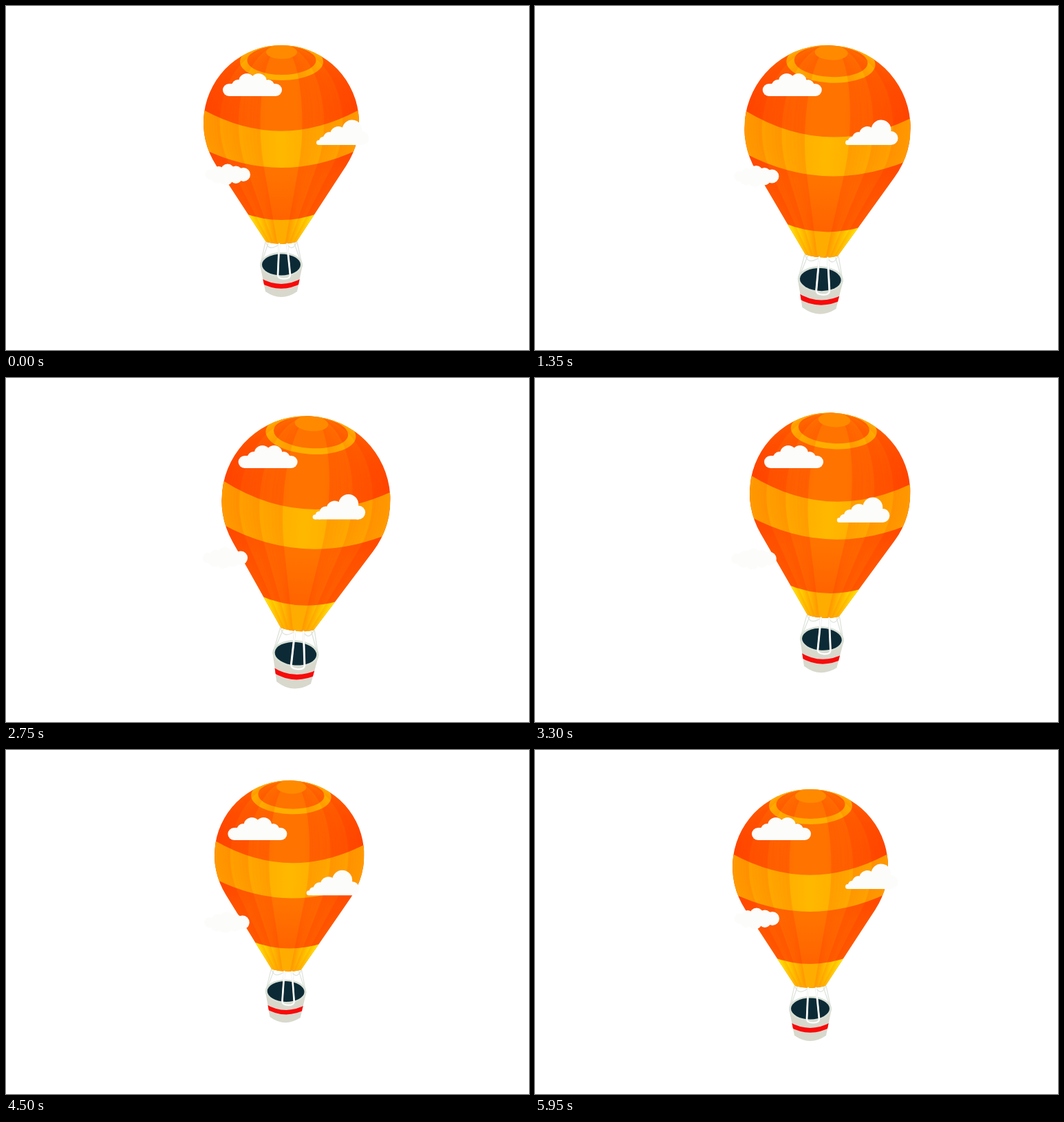
These frames come from a looping animation (760x500 px, 6 s). An HTML page:

```html
<!DOCTYPE html>
<html lang="en">
<head>
<meta charset="utf-8">
<title>Balloon</title>
<style>
  html, body { margin: 0; width: 100%; height: 100%; overflow: hidden; background: #fff; }
  svg { display: block; width: 760px; height: 500px; }
  .cloud { fill: #fcfcfa; }
  .rope { fill: none; stroke-linecap: round; stroke-linejoin: round; }
</style>
</head>
<body>
<svg viewBox="0 0 760 500">
  <defs>
    <linearGradient id="red" gradientUnits="userSpaceOnUse" x1="287" x2="400" spreadMethod="reflect">
      <stop offset="0" stop-color="#ff4300"/>
      <stop offset=".4" stop-color="#ff5c00"/>
      <stop offset=".8" stop-color="#ff7300"/>
    </linearGradient>
    <linearGradient id="yellow" gradientUnits="userSpaceOnUse" x1="287" x2="400" spreadMethod="reflect">
      <stop offset="0" stop-color="#ff9c00"/>
      <stop offset="1" stop-color="#ffb800"/>
    </linearGradient>
    <linearGradient id="skirt" gradientUnits="userSpaceOnUse" x1="351" x2="400" spreadMethod="reflect">
      <stop offset="0" stop-color="#ffee00"/>
      <stop offset=".8" stop-color="#ffac00"/>
    </linearGradient>
    <linearGradient id="shade" x2="0" y2="1">
      <stop offset="0" stop-color="#ff3000" stop-opacity="0"/>
      <stop offset="1" stop-color="#ff3000" stop-opacity=".25"/>
    </linearGradient>
    <path id="bandShape" d="M287 151Q400 212.500 513 151V208Q400 262 287 208Z"/>
    <path id="skirtShape" d="M345 301Q400 321 455 301V350H345Z"/>
    <path id="ringShape" fill-rule="evenodd" clip-rule="evenodd"
      d="M340 81a60.500 27 0 0 1 121 0a60.500 27 0 0 1 -121 0ZM350.500 79a50 21 0 0 1 100 0a50 21 0 0 1 -100 0Z"/>
    <clipPath id="trim">
      <use href="#bandShape"/><use href="#skirtShape"/><use href="#ringShape"/>
    </clipPath>
    <clipPath id="hull"><path id="hullPath"/></clipPath>
    <path id="tubShape" d="M369 376L377 415Q400 431 423 415L431 376Z"/>
    <clipPath id="tub"><use href="#tubShape"/></clipPath>
    <path id="loop" d="M397 346L395 391Q395 396.500 404 396.500Q413 396.500 413 391L408.500 346"/>
    <g id="panels" fill="#ff3000" fill-rule="evenodd"></g>
  </defs>

  <g id="balloon">
    <g clip-path="url(#hull)">
      <rect x="280" y="50" width="240" height="300" fill="url(#red)"/>
      <rect x="280" y="245" width="240" height="68" fill="url(#shade)"/>
      <use href="#panels"/>
      <use href="#bandShape" fill="url(#yellow)"/>
      <use href="#skirtShape" fill="url(#skirt)"/>
      <use href="#ringShape" fill="#ffae00"/>
      <g clip-path="url(#trim)"><use href="#panels" opacity=".6"/></g>
      <ellipse cx="400.5" cy="67" rx="22.5" ry="10" fill="#ff8a00"/>
    </g>

    <g class="rope" stroke="#dfe4dc" stroke-width="1.3">
      <path d="M377 343L370 375M381 345L373 368M423 343L430 375M419 345L427 368"/>
      <path d="M378 344Q382 357 396 347M409 347Q416 357 422 344"/>
    </g>

    <use href="#tubShape" fill="#d8d8cd"/>
    <path clip-path="url(#tub)" fill="#f80a0a" d="M368 394.500Q400 413.500 432 394.500V401.500Q400 420 368 401.500Z"/>
    <ellipse cx="400" cy="376" rx="31" ry="18" fill="#d9e0d5"/>
    <ellipse cx="400" cy="376" rx="28" ry="15.500" fill="#0c2a36"/>
    <use href="#loop" class="rope" stroke="#dfe4dc" stroke-width="2.800"/>
    <use href="#loop" class="rope" stroke="#fff" stroke-width="2"/>
  </g>

  <g id="cloudA" class="cloud">
    <rect x="315" y="113" width="86" height="18" rx="9"/>
    <circle cx="337" cy="116" r="9"/>
    <circle cx="350" cy="110" r="12"/>
    <circle cx="367" cy="110" r="12"/>
    <circle cx="381" cy="116" r="9"/>
  </g>

  <g id="cloudB" class="cloud">
    <path d="M454.500 202L470 188L502 180L518 202Z"/>
    <circle cx="454.500" cy="198.500" r="3.500"/>
    <circle cx="461" cy="196" r="6"/>
    <circle cx="470" cy="192" r="9"/>
    <circle cx="483" cy="187" r="12"/>
    <circle cx="503" cy="180" r="14.500"/>
    <circle cx="517.500" cy="192" r="10"/>
  </g>

  <g id="cloudC" class="cloud">
    <circle cx="297" cy="245" r="7.500"/>
    <circle cx="309" cy="242" r="9"/>
    <circle cx="322" cy="239.500" r="10"/>
    <circle cx="334" cy="242" r="9.500"/>
    <circle cx="345" cy="245" r="10"/>
    <circle cx="307" cy="249" r="9"/>
    <circle cx="320" cy="251" r="9.500"/>
    <circle cx="334" cy="249" r="9"/>
  </g>
</svg>

<script>
const LOOP = 6000, STEP = 50;
const HIGH = 2250, LOW = 4350; // times of the largest and the smallest pose
const $ = id => document.getElementById(id);

// Envelope outline, squeezed sideways by k
function outline(k) {
  const x = d => (400 + d * k).toFixed(2);
  return `M${x(94.3)} 232.2A${113 * k} 113 0 1 0 ${x(-94.3)} 232.2` +
    `L${x(-22)} 343Q400 349 ${x(22)} 343Z`;
}

// Each panel is darkest along its inner seam and fades outward
function panelShading() {
  const seams = [.27, .55, .79, 1], slices = 6;
  let rings = '';
  for (let i = 0; i < 3; i++) {
    const width = (seams[i + 1] - seams[i]) / slices;
    for (let j = 0; j < slices; j++) {
      const k = seams[i] + j * width;
      const alpha = (.24 * (1 - j / slices)).toFixed(3);
      rings += `<path opacity="${alpha}" d="${outline(k)}${outline(k + width)}"/>`;
    }
  }
  return rings;
}

$('hullPath').setAttribute('d', outline(1));
$('panels').innerHTML = panelShading();

const smooth = u => u * u * (3 - 2 * u);
const progress = (t, from, to) => Math.min(1, Math.max(0, (t - from) / (to - from)));

// Eases from 0 up to 1 and back to 0
const swell = (t, from, peak, to) =>
  smooth(progress(t, from, peak)) * (1 - smooth(progress(t, peak, to)));

// Rest, high, low, rest; passes through low without stopping if it lies between
function travel(t, rest, high, low) {
  if (t < HIGH) return rest + (high - rest) * smooth(t / HIGH);
  const passes = (low - rest) * (high - low) > 0;
  const speed = passes ? (rest - high) / (LOOP - HIGH) : 0;
  if (t < LOW) {
    const h = LOW - HIGH, u = (t - HIGH) / h;
    return high + (low - high) * smooth(u) + h * speed * u * u * (u - 1);
  }
  const h = LOOP - LOW, u = (t - LOW) / h;
  return low + (rest - low) * smooth(u) + h * speed * u * (1 - u) ** 2;
}

function place(id, dx, dy) {
  $(id).setAttribute('transform', `translate(${dx} ${dy})`);
}

function draw(t) {
  const x = travel(t, 400, 438.6, 413.3);
  const y = travel(t, 170, 182, 152.5);
  const scale = travel(t, 1, 1.105, .961);
  const tilt = travel(t, 0, 4.1, 1.65);
  $('balloon').setAttribute('transform',
    `translate(${x} ${y}) rotate(${tilt}) scale(${scale}) translate(-400 -170)`);

  const b = swell(t, 2000, 4000, LOOP);
  const c = swell(t, 800, 3150, 5300);
  place('cloudA', .63 * (x - 400), 0);
  place('cloudB', -17 * b, 11 * b);
  place('cloudC', -4.2 * c, 18 * c);
}

const start = performance.now();
function tick() {
  const t = (performance.now() - start) % LOOP;
  draw(Math.floor(t / STEP) * STEP);
  requestAnimationFrame(tick);
}
tick();
</script>
</body>
</html>
```
